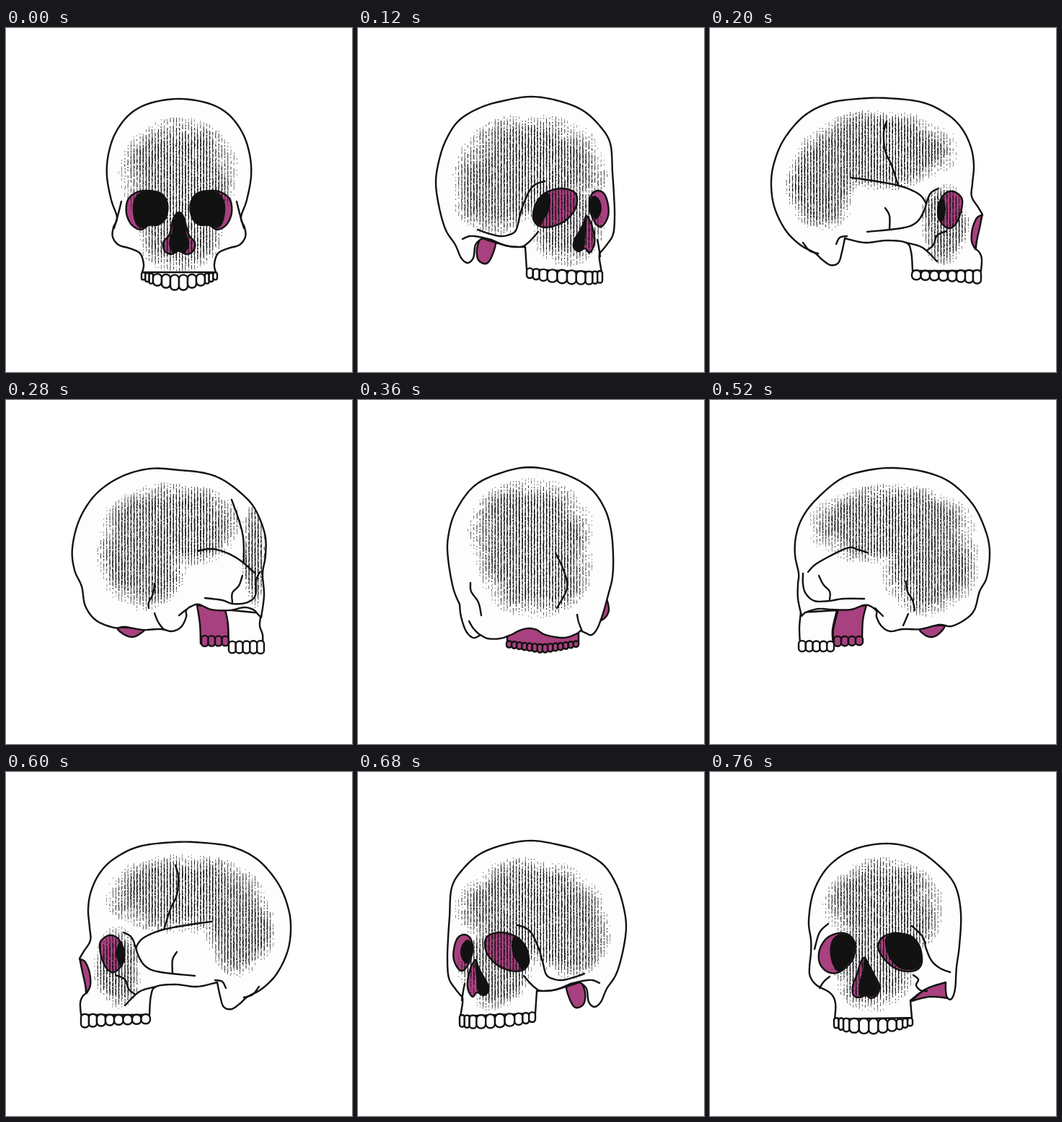
Animation, 480 px wide and 476 px high, one loop 0.8 s. Source, as an HTML page with a canvas:

```html
<!DOCTYPE html>
<html lang="en">
<head>
<meta charset="utf-8">
<title>Turning skull</title>
<style>
html, body { margin: 0; width: 100%; height: 100%; overflow: hidden; background: #fff; }
canvas { display: block; width: 480px; height: 476px; }
</style>
</head>
<body>
<canvas id="stage" width="480" height="476"></canvas>
<script>
const STEPS = 20, STEP_MS = 40, AXIS = 480;
const INK = '#121212', BONE = '#fdfdfd', PURPLE = '#a8417f';
const ctx = document.getElementById('stage').getContext('2d');

// Part kinds by first letter: b purple, w bone, k black, l line,
// t teeth, u purple teeth, h hatching. A final L or R is the side.
// "!" marks a sharp corner.
const shapes = {
  0: {
    wS: '189,338! 191,327 186,312 172,305 156,300 148,289 149,276 154,262 146,238 140,205 142,175 152,145 172,119 200,104 240,98 280,104 308,119 328,145 338,175 340,205 334,238 326,262 331,276 332,289 324,300 308,305 294,312 289,327 291,338!',
    lbL: '160,240 155,260 150,277',
    bEL: '195,225 215,229 224,243 222,262 212,272 198,273 187,279 174,272 167,256 169,238 180,228',
    kEL: '195,226 216,229 223,244 221,262 211,272 198,273 188,277 180,271 176,255 177,240 184,229',
    bN: '240,255 247,263 253,285 262,297 260,308 252,313 243,310 240,308 236,310 228,313 220,308 218,297 227,285 232,264',
    kN: '240,256 247,265 250,283 254,298 249,311 243,310 240,307 237,310 231,311 226,298 230,283 233,265',
    h: '240,202,84,80 240,275,62,66',
    t: '12 188,338,347 204,340,355 240,342,364 276,340,355 293,338,347'
  },
  19: {
    bm: '327,291! 331,313! 305,311 279,317! 300,300',
    wS: '173,342! 174,320 167,306 148,295 139,283 138,270 140,250 140,232 137,205 144,165 165,130 200,107 245,99 285,107 318,130 340,157 348,195 346,240 342,270 340,300 335,314 329,312 327,302 327,291! 300,300 278,316! 280,340!',
    lbL: '164,210 152,222 145,245',
    lbR: '280,213 295,228 300,245 308,262 320,272 333,277',
    lcL: '166,283 158,290 152,299',
    lcR: '282,281 289,287 286,295 292,302 301,303',
    bEL: '178,223 192,225 201,237 199,257 189,270 176,278 162,276 152,264 152,246 162,230',
    kEL: '182,224 194,227 200,238 198,256 189,268 178,276 171,268 167,255 167,240 172,229',
    bER: '262,223 280,228 291,242 294,262 288,273 273,276 256,271 241,258 233,243 238,230 250,224',
    kER: '263,224 280,229 291,243 293,262 287,272 273,274 261,270 250,259 244,244 243,232 250,225',
    bN: '214,257 222,270 230,285 235,296 232,308 223,313 216,309 208,312 199,309 198,296 204,280 208,266',
    kN: '215,258 222,270 230,285 234,296 231,307 223,311 216,308 209,311 206,302 208,288 212,275 213,264',
    h: '240,185,84,68 225,270,58,62 250,200,75,60',
    t: '11 172,340,353 190,341,360 227,341,363 262,342,357 281,340,350'
  },
  3: {
    bm: '172,288 165,305 167,321 178,326 186,315 191,295 180,290',
    wS: '234,334! 232,303! 210,302 188,296 172,291! 163,300 160,318 152,325 143,318 135,300 122,280 113,250 108,215 112,185 122,155 140,128 170,110 205,100 240,95 275,100 310,113 335,135 350,160 353,200 355,230 356,260 354,285 345,300 335,312! 335,320 338,338!',
    lmL: '145,292 155,288 168,289 185,293',
    lbL: '166,279 180,284 197,288 210,286 219,280 224,262 229,245 238,225 247,216 259,212',
    lcL: '185,293 205,301 225,303 235,298 244,289 250,282',
    lj: '332,293 334,303 336,316',
    bEL: '285,222 300,227 304,238 300,253 287,267 268,275 251,274 243,263 246,245 256,231 270,224',
    kEL: '262,227 267,238 264,255 257,266 254,273 247,270 242,261 245,245 252,234',
    bER: '333,225 342,230 347,245 347,260 341,272 335,275 328,268 322,253 321,240 325,229',
    kER: '328,232 335,238 338,248 336,258 330,265 325,259 321,248 322,238',
    bN: '317,260 324,272 328,290 327,302 321,311 315,305 306,309 299,303 301,292 308,280 313,270',
    kN: '317,261 317,275 315,290 314,303 306,308 299,303 301,291 308,279 313,269',
    h: '242,192,106,76 290,268,52,62 190,222,62,64',
    t: '10 234,332,345 256,334,350 290,335,354 322,337,355 339,336,352'
  },
  15: {
    wS: '104,336! 103,320 106,311 111,306! 110,290 105,270 102,258! 108,248 117,233 116,215 114,190 118,165 130,140 150,120 185,103 235,97 275,98 315,104 350,122 378,155 392,190 395,220 390,250 375,280 355,300 335,311 325,320 313,328 302,325 297,310 293,291! 265,297 235,294 208,297 201,310 199,336!',
    lmR: '290,288 300,290 305,299',
    lo: '330,312 342,308 351,297',
    lt: '235,129 239,145 237,170 228,190 219,218',
    la: '285,207 250,212 215,219 190,230 180,243',
    lbR: '163,222 175,230 184,255 195,270 215,277 262,282',
    ls: '237,249 231,260 231,279',
    lcR: '152,281 165,287 170,300 178,307',
    lj: '208,297 185,304 165,323',
    bEL: '117,233', kEL: '117,233',
    bER: '143,226 155,230 163,245 163,262 155,274 146,277 137,268 131,250 131,235',
    kER: '158,236 164,246 164,260 159,268 155,262 153,250 155,240',
    bN: '103,259! 110,263 116,278 117,295 112,306! 109,290 105,272',
    kN: '104,262',
    h: '245,168,112,56 155,270,34,58 325,215,50,68',
    t: '8 104,335,354 126,335,352 150,336,350 175,336,349 200,335,348'
  },
  14: {
    bj: '190,300! 188,338! 207,337! 208,305 215,290!',
    u: '2 188,329,342 208,328,340',
    wS: '112,336! 111,318 114,300 111,280 113,262 118,245 115,215 116,185 128,150 155,122 195,102 245,95 300,98 345,115 378,148 398,185 403,215 398,245 386,270 372,298 350,311 330,314 310,316 292,324 280,324 272,312 267,293 255,290 235,293 214,290! 205,296 190,305 186,337!',
    bER: '122,236 130,242 134,256 130,270 123,262',
    la: '252,210 225,207 195,212 165,228 152,240',
    lb: '138,235 145,255 155,270 180,277 238,278',
    ls: '196,246 199,258 199,276',
    lm: '264,288 274,296',
    lt: '200,132 203,155 195,180 184,216',
    h: '255,172,118,60 325,218,62,68',
    t: '7 112,334,351 187,334,348'
  },
  13: {
    bj: '178,290! 171,318 172,338! 211,336! 212,305 217,284!',
    bo: '292,316 298,325 308,328 318,323 324,312',
    u: '4 172,327,341 212,327,339',
    wj: '126,294! 124,315 125,338! 171,338! 170,318 176,291!',
    wS: '127,299! 122,275 122,255 123,240 118,215 119,190 127,165 145,140 180,110 215,98 255,94 300,100 335,115 365,145 382,180 388,210 384,245 374,265 367,290 355,303 335,313 318,311 292,317 268,317 250,320 238,313 231,300 231,292 222,285 213,284 195,290 170,290 150,289 132,294!',
    lm: '275,296 268,312',
    ln: '229,288 240,299',
    lo: '272,251 274,265 281,277 284,291',
    la: '136,238 150,225 190,205 205,207 218,211',
    ls: '151,243 157,255 166,265 166,276',
    lb: '214,275 185,275 165,278 145,278 133,268 129,255 129,240',
    h: '250,173,118,58 305,225,70,74',
    t: '5 123,333,348 172,334,348'
  },
  12: {
    bo: '285,316 295,326 308,326 320,316',
    bj: '150,288! 148,340! 236,337! 236,316!',
    u: '9 148,333,347 236,330,341',
    wj: '140,290! 137,338! 148,340! 150,292!',
    t: '2 136,334,348 149,335,348',
    wS: '140,291 127,265 121,235 120,200 128,165 148,132 185,106 230,95 270,95 310,104 345,127 367,165 373,205 368,245 357,275 345,303 330,318 310,321 295,318 275,314 255,320 235,326 215,322 206,325 197,321 190,310 185,297 172,292 155,294',
    lm: '226,297 222,312 214,321',
    lo: '238,232 232,255 240,275 246,290',
    la: '130,245 145,232 165,222 178,225',
    lb: '160,277 145,280 132,273',
    h: '245,178,108,66 270,230,75,70'
  },
  11: {
    bj: '174,318! 174,338! 225,345 273,338! 273,322! 244,312',
    bcL: '136,275 132,290 137,301 146,305 142,290',
    u: '14 174,333,341 199,336,346 224,338,350 249,336,346 274,333,342',
    wS: '244,316 232,318 220,325 195,329 178,324 171,319! 165,322 156,325 148,316 140,295 133,270 127,245 126,215 129,180 138,150 158,122 195,102 242,93 285,102 320,120 345,155 355,190 355,220 348,260 339,283! 337,300 330,320 320,329 310,325! 300,330 283,330 268,325 256,319',
    lmL: '176,297 174,307 169,320',
    lmR: '326,306 320,316 311,325',
    laL: '206,212 195,235 190,260 204,288',
    laR: '324,253 323,265 313,280 309,298',
    h: '240,180,88,74 234,230,82,72'
  },
  7: {
    bj: '265,284! 269,310 270,337! 309,337! 307,300 302,288!',
    bo: '156,315 163,324 175,328 185,324 190,317',
    u: '4 271,326,341 309,327,340',
    wj: '304,290! 308,310 309,340! 356,340! 356,325 352,312 354,295!',
    wS: '350,297! 354,301! 358,270 356,240 360,215 359,185 345,150 325,128 300,110 275,101 240,97 200,95 160,106 125,130 102,165 92,205 95,235 105,258 110,285 125,305 150,315 165,314 190,318 215,317 230,320 243,314 250,300 250,291 258,285 268,283 285,290 310,291 330,287 343,290',
    lm: '206,295 211,307 219,318',
    ln: '250,290 240,298',
    lo: '206,254 204,268 198,280 198,288',
    lt: '313,138 322,163 329,190 330,225',
    la: '266,209 285,206 305,211 325,222 346,240',
    ls: '328,243 323,257 314,267 314,280',
    lb: '276,274 300,277 315,282 335,280 346,270 347,250 352,238',
    h: '230,173,100,60 190,218,64,74 344,215,16,75',
    t: '5 309,334,350 358,333,351'
  }
};

const mix = (a, b, u) => a.map((v, i) => v + (b[i] - v) * u);

// Catmull-Rom curve as a polyline
function curve(pts, closed) {
  const n = pts.length, out = [pts[0]];
  const at = i => closed ? pts[(i + n) % n] : pts[Math.max(0, Math.min(n - 1, i))];
  for (let i = 0; i < (closed ? n : n - 1); i++) {
    const [a, b, c, d] = [at(i - 1), at(i), at(i + 1), at(i + 2)];
    if (b[0] === c[0] && b[1] === c[1]) continue;
    for (let s = 1; s <= 8; s++) {
      const u = s / 8;
      out.push(b.map((p, j) => p + u / 2 * (c[j] - a[j] +
        u * (2 * a[j] - 5 * p + 4 * c[j] - d[j] + u * (3 * (p - c[j]) + d[j] - a[j])))));
    }
  }
  return out;
}

function resample(line, n = 220) {
  const len = [0];
  for (let i = 1; i < line.length; i++)
    len.push(len[i - 1] + Math.hypot(line[i][0] - line[i - 1][0], line[i][1] - line[i - 1][1]));
  let i = 0;
  return Array.from({ length: n + 1 }, (_, k) => {
    const d = len[len.length - 1] * k / n;
    while (i < line.length - 2 && len[i + 1] < d) i++;
    return mix(line[i], line[i + 1] || line[i], (d - len[i]) / (len[i + 1] - len[i] || 1));
  });
}

function parse(name, text) {
  const words = text.split(' '), kind = name[0];
  const count = 'tu'.includes(kind) ? +words.shift() : 0;
  const pts = words.flatMap(w => {
    const p = w.replace('!', '').split(',').map(Number);
    return w.endsWith('!') ? [p, p] : [p];
  });
  return { count, pts: 'tuh'.includes(kind) ? pts : curve(pts, kind !== 'l') };
}

const mapPose = (pose, fn) => Object.fromEntries(Object.entries(pose).map(fn));

const mirror = pose => mapPose(pose, ([name, part]) => {
  const pts = part.pts.map(([x, ...rest]) => [AXIS - x, ...rest]);
  if (name !== 'h') pts.reverse();
  return [name.replace(/[LR]$/, s => s === 'L' ? 'R' : 'L'), { ...part, pts }];
});

function between(a, b) {
  const pose = {};
  for (const name of Object.keys(a).filter(n => b[n])) {
    let p = a[name].pts, q = b[name].pts;
    if (!'tuh'.includes(name[0])) {
      p = resample(p);
      q = resample(q);
      const gap = (i, j) => Math.hypot(p[i][0] - q[j][0], p[i][1] - q[j][1]);
      const end = p.length - 1;
      if (name[0] === 'l' && gap(0, end) + gap(end, 0) < gap(0, 0) + gap(end, end)) q.reverse();
    }
    pose[name] = {
      count: Math.round((a[name].count + b[name].count) / 2),
      pts: p.map((v, i) => mix(v, q[i], 0.5))
    };
  }
  return pose;
}

const poses = mapPose(shapes, ([k, pose]) => [k, mapPose(pose, ([n, s]) => [n, parse(n, s)])]);
poses[0] = { ...mirror(poses[0]), ...poses[0] };
for (let k = 1; k < STEPS; k++)
  if (!poses[k] && poses[STEPS - k]) poses[k] = mirror(poses[STEPS - k]);
for (let k = 2; k < STEPS; k += 2)
  poses[k] = poses[k] || between(poses[k - 1], poses[k + 1]);

function trace(pts, closed) {
  ctx.beginPath();
  pts.forEach(([x, y]) => ctx.lineTo(x, y));
  if (closed) ctx.closePath();
}

function drawTeeth({ pts, count }, fill) {
  const edge = i => {
    const s = i / count * (pts.length - 1), j = Math.min(pts.length - 2, Math.floor(s));
    return mix(pts[j], pts[j + 1], s - j);
  };
  ctx.fillStyle = fill;
  for (let i = 0; i < count; i++) {
    const a = edge(i), b = edge(i + 1), w = b[0] - a[0];
    const top = (a[1] + b[1]) / 2, low = (a[2] + b[2]) / 2;
    ctx.beginPath();
    ctx.roundRect(a[0], top, w, low - top, Math.min(w, low - top) * 0.45);
    ctx.fill();
    ctx.stroke();
  }
}

const rand = (x, y) => {
  const v = Math.sin(x * 12.9898 + y * 78.233) * 43758.5453;
  return v - Math.floor(v);
};

// Worn vertical hatching, fading out at the rim of the ellipses
function drawHatch(spots, skull, seed) {
  ctx.save();
  trace(skull, true);
  ctx.clip();
  ctx.fillStyle = INK;
  for (let x = 102; x < 400; x += 4.2) {
    for (let y = 104; y < 340; y += 2) {
      const depth = Math.max(...spots.map(([cx, cy, rx, ry]) =>
        1 - ((x - cx) / rx) ** 2 - ((y - cy) / ry) ** 2));
      if (depth <= 0) continue;
      const blot = Math.sin(x * 0.06 + seed) * Math.sin(y * 0.08 + seed * 2 + x * 0.02);
      const w = Math.min(1.8, 0.35 + depth * 2.4 + blot * 0.35) - rand(x + seed, y) ** 2 * 1.1;
      if (w > 0.3) ctx.fillRect(x - w / 2 + (rand(y, x) - 0.5) * 0.5, y, w, 2);
    }
  }
  ctx.restore();
}

function draw(k) {
  const pose = poses[k];
  ctx.clearRect(0, 0, 480, 476);
  ctx.lineCap = ctx.lineJoin = 'round';
  ctx.strokeStyle = INK;
  for (const [name, part] of Object.entries(pose)) {
    const kind = name[0];
    ctx.lineWidth = 2.4;
    if (kind === 'h') continue;
    if (kind === 't' || kind === 'u') {
      drawTeeth(part, kind === 't' ? BONE : PURPLE);
      continue;
    }
    trace(part.pts, kind !== 'l');
    if (kind !== 'l') {
      ctx.fillStyle = { b: PURPLE, w: BONE, k: INK }[kind];
      ctx.fill();
    }
    if (kind !== 'k') ctx.stroke();
  }
  drawHatch(pose.h.pts, pose.wS.pts, k);
}

const start = performance.now();
let shown = -1;
function tick() {
  const k = Math.floor((performance.now() - start) / STEP_MS) % STEPS;
  if (k !== shown) draw(shown = k);
  requestAnimationFrame(tick);
}
tick();
</script>
</body>
</html>
```
